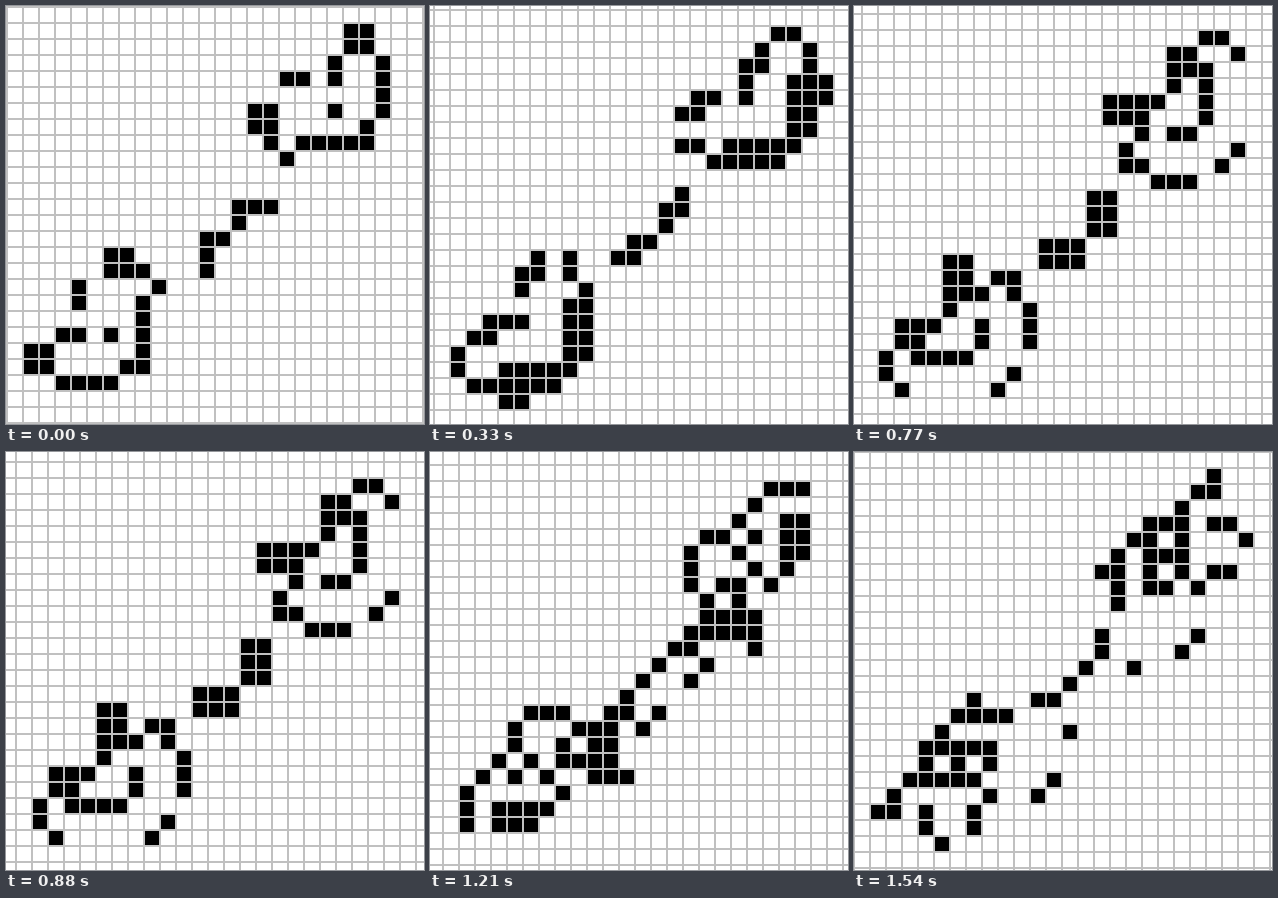
Recreate the animation shown at these times as an HTML page with a canvas. Size 418x418 px, loop 1650 ms.

```html
<!DOCTYPE html>
<html lang="en">
<head>
<meta charset="utf-8">
<title>Diagonal spaceship</title>
<style>
  html, body { margin: 0; width: 100%; height: 100%; overflow: hidden; background: #fff; }
  canvas { display: block; }
</style>
</head>
<body>
<canvas id="stage" width="418" height="418"></canvas>
<script>
const ctx = document.getElementById('stage').getContext('2d');
const STAGE = 418, PITCH = 16, LINE = 2, SIZE = 26;
const STEP_MS = 110, STEPS = 15, STEPS_PER_GENERATION = 3;

// Row -> columns; the ship is mirrored across the main diagonal.
const halfShip = {
  1: [21, 22], 2: [21, 22], 3: [20, 23], 4: [17, 18, 20, 23], 5: [23],
  6: [15, 16, 20, 23], 7: [15, 16, 22], 8: [16, 18, 19, 20, 21, 22],
  9: [17], 12: [14, 15, 16], 13: [14]
};

const makeGrid = rule => Array.from({ length: SIZE }, (_, row) =>
  Array.from({ length: SIZE }, (_, col) => rule(row, col)));

const inHalf = (row, col) => (halfShip[row] || []).includes(col);

function countNeighbours(grid, row, col) {
  let count = 0;
  for (let dr = -1; dr <= 1; dr++)
    for (let dc = -1; dc <= 1; dc++)
      if ((dr || dc) && grid[row + dr]?.[col + dc]) count++;
  return count;
}

const evolve = grid => makeGrid((row, col) => {
  const count = countNeighbours(grid, row, col);
  return count === 3 || (count === 2 && grid[row][col]);
});

const generations = [makeGrid((row, col) => inHalf(row, col) || inHalf(col, row))];
while (generations.length < STEPS / STEPS_PER_GENERATION)
  generations.push(evolve(generations.at(-1)));

function draw(step) {
  // The board slides one cell per loop, cancelling the ship's own travel.
  const offset = Math.round(step * PITCH / STEPS);
  ctx.fillStyle = '#fff';
  ctx.fillRect(0, 0, STAGE, STAGE);

  ctx.fillStyle = '#c0c0c0';
  for (let p = offset - PITCH; p < STAGE; p += PITCH) {
    ctx.fillRect(p, 0, LINE, STAGE);
    ctx.fillRect(0, p, STAGE, LINE);
  }

  ctx.fillStyle = '#000';
  const grid = generations[Math.floor(step / STEPS_PER_GENERATION)];
  const place = index => offset + LINE + index * PITCH;
  grid.forEach((cells, row) => cells.forEach((alive, col) => {
    if (alive) ctx.fillRect(place(col), place(row), PITCH - LINE, PITCH - LINE);
  }));
}

const start = performance.now();
function tick() {
  const elapsed = performance.now() - start;
  draw(Math.floor(elapsed / STEP_MS) % STEPS);
  requestAnimationFrame(tick);
}
tick();
</script>
</body>
</html>
```
